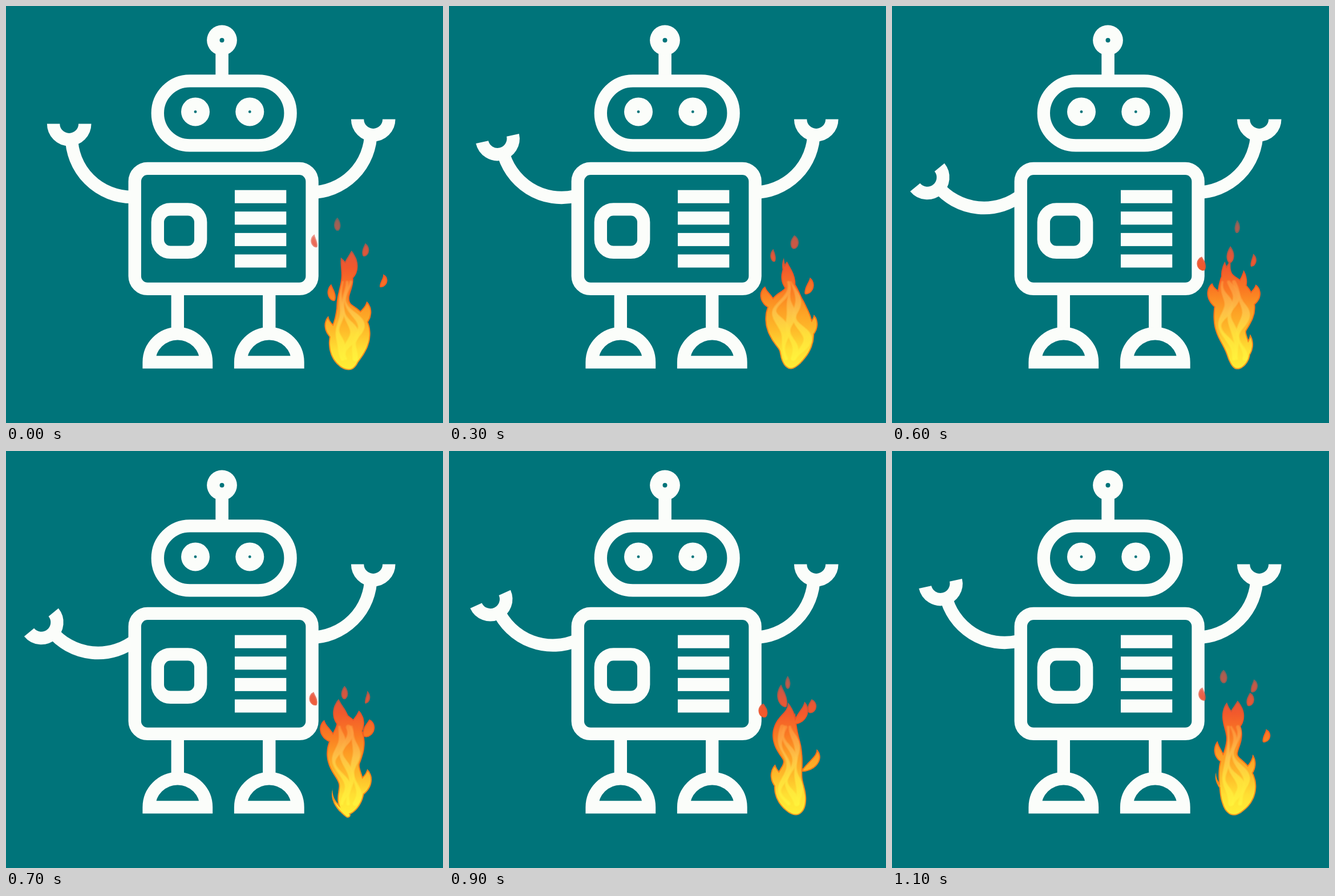
These frames come from a looping animation (766x731 px, 1200 ms). An HTML page with a canvas:

```html
<!DOCTYPE html>
<html lang="en">
<head>
<meta charset="utf-8">
<title>Waving robot</title>
<style>
html, body { margin: 0; width: 100%; height: 100%; overflow: hidden; background: #00747a; }
canvas { display: block; }
</style>
</head>
<body>
<canvas id="stage" width="766" height="731"></canvas>
<script>
const ctx = document.getElementById('stage').getContext('2d');
const TEAL = '#00747a', WHITE = '#fbfdfa', LINE = 22.4;
const LOOP = 1200, BEAT = 100, TAU = Math.PI * 2;

// Left hand: x, y and tilt in degrees, two beats per pose, down and up again
const POSES = [[110.7, 206.5, 0], [85, 232.5, -12.8], [72.5, 259.7, -24.4], [61.9, 300.4, -39.3]];

// ---- Fire: a swaying column with licks that rise, break off and fade ----
const BASE = 632, HEIGHT = 192, LIFE = 900;

// Each lick: birth in ms, start, end, size
const LICKS = [
  { born: 1100, from: [569, 580], to: [536, 425], size: 14 },
  { born: 300, from: [572, 548], to: [541, 420], size: 13 },
  { born: 700, from: [573, 610], to: [568, 425], size: 10 },
  { born: 200, from: [640, 578], to: [634, 420], size: 14 },
  { born: 500, from: [622, 612], to: [672, 455], size: 10 },
  { born: 1000, from: [632, 565], to: [633, 440], size: 10 },
  { born: 900, from: [606, 475], to: [605, 395], size: 12 },
  { born: 100, from: [592, 485], to: [594, 405], size: 10 },
  { born: 500, from: [584, 480], to: [580, 365], size: 11 },
  { born: 500, from: [614, 490], to: [634, 420], size: 11 }
];

function ramp(...stops) {
  const g = ctx.createLinearGradient(0, 360, 0, 636);
  stops.forEach(([at, color]) => g.addColorStop(at, color));
  return g;
}
const EDGE = ramp([0, 'rgba(225,90,75,.4)'], [.22, 'rgba(225,80,60,.7)'], [.4, '#ee5426'], [.7, '#f97a1a'], [1, '#f59a22']);
const FIRE = ramp([0, 'rgba(235,90,70,.2)'], [.22, 'rgba(236,85,60,.6)'], [.36, '#f2592c'], [.5, '#fa7a22'],
  [.62, '#fd9d24'], [.75, '#feb929'], [.88, '#ffdf33'], [1, '#ffee34']);
const GLOW = ramp([.36, 'rgba(255,150,60,0)'], [.5, '#fd9f40'], [.64, '#fdc44a'], [.78, '#ffe23c'], [1, '#fff93c']);

const lerp = (a, b, u) => a + (b - a) * u;
const clamp = (v, lo, hi) => Math.max(lo, Math.min(hi, v));

// Column centre and half width at height h; both waves travel upwards
const sway = (h, t) => 604 - .07 * h + 5 * Math.sin(TAU * (t / 400 - h / 90));

function girth(h, t) {
  const swell = Math.cos(TAU * (t - 300 - 7.2 * (h - 74)) / LOOP);
  return 30 * Math.sin(Math.PI * (h / HEIGHT) ** .6) * (1 + clamp(h / 200, .1, .5) * swell);
}

function columnDots(t) {
  const dots = [];
  for (let h = 6; h < HEIGHT; h += 2) dots.push([sway(h, t), BASE - h, girth(h, t)]);
  return dots;
}

function lickDots({ born, from, to, size }, t) {
  const age = ((t - born + LOOP) % LOOP) / LIFE;
  if (age > 1) return [];
  const x = lerp(from[0], to[0], age), y = lerp(from[1], to[1], age);
  const rootX = sway(clamp(BASE - y - 28, 0, HEIGHT), t);
  const bendX = x + (x - rootX) * .25;
  const broken = clamp((age - .35) * 2, 0, .55);
  const r = size * Math.min(1, age * 5) * (1 - .6 * age);
  const dots = [];
  for (let i = 0; i <= 40; i++) {
    const q = i / 40, s = lerp(broken, 1, q);
    const neck = broken ? 0 : 5 * (1 - q);
    dots.push([
      lerp(lerp(rootX, bendX, s), lerp(bendX, x, s), s),
      lerp(lerp(y + 28, y + 6, s), lerp(y + 6, y - 20, s), s),
      r * Math.sin(Math.PI * q ** .75) + neck
    ]);
  }
  return dots;
}

function fillDots(dots, inset, paint) {
  ctx.fillStyle = paint;
  ctx.beginPath();
  for (const [x, y, r] of dots) {
    if (r <= inset) continue;
    ctx.moveTo(x + r - inset, y);
    ctx.arc(x, y, r - inset, 0, TAU);
  }
  ctx.fill();
}

function drawFire(t) {
  const dots = columnDots(t).concat(...LICKS.map(l => lickDots(l, t)));
  fillDots(dots, 0, EDGE);
  fillDots(dots, 2, FIRE);

  // Bright wisps winding up through the column
  for (const lane of [-.5, 0, .5]) {
    const wisp = [];
    for (let h = 14; h < 150; h += 2) {
      const wave = Math.sin(TAU * (t / 600 - h / 75 + lane * .7));
      const w = girth(h, t);
      wisp.push([sway(h, t) + w * (lane + .2 * wave), BASE - h, w * .13 * (1 + .5 * wave)]);
    }
    ctx.globalAlpha = .5;
    fillDots(wisp, -1.5, GLOW);
    ctx.globalAlpha = .8;
    fillDots(wisp, 0, GLOW);
  }
  ctx.globalAlpha = 1;
}

// ---- Robot ----
function box(x, y, w, h, r) {
  ctx.beginPath();
  ctx.roundRect(x, y, w, h, r);
  ctx.stroke();
}

function disc(x, y, r, hole) {
  [[r, WHITE], [hole, TEAL]].forEach(([size, color]) => {
    ctx.fillStyle = color;
    ctx.beginPath();
    ctx.arc(x, y, size, 0, TAU);
    ctx.fill();
  });
}

// Cupped hand at the local origin with a quarter-circle arm towards the body
function arm([x, y, tilt], side) {
  ctx.save();
  ctx.translate(x, y);
  ctx.rotate(tilt * TAU / 360);
  ctx.scale(side, 1);
  ctx.beginPath();
  ctx.arc(0, 0, 27.6, 0, Math.PI);
  ctx.stroke();
  ctx.beginPath();
  ctx.arc(110, 22.6, 105.8, TAU / 4, TAU / 2);
  ctx.stroke();
  ctx.restore();
}

function drawRobot(pose) {
  ctx.strokeStyle = WHITE;
  ctx.lineWidth = LINE;
  arm(pose, 1);
  arm([643.7, 198.5, 0], -1);

  ctx.fillStyle = WHITE;
  ctx.fillRect(367.3, 78, 22.6, 46);
  for (const x of [300.8, 461.3]) {
    ctx.fillRect(x - LINE / 2, 500, LINE, 70);
    ctx.beginPath();
    ctx.arc(x, 624.4, 50.2, Math.PI, TAU);
    ctx.closePath();
    ctx.stroke();
  }
  for (let i = 0; i < 4; i++) ctx.fillRect(401, 322.7 + i * 37.6, 90.3, 23);

  box(265.8, 131.4, 232.8, 113, 56.4);
  box(225.7, 284.9, 310.9, 211, 22.5);
  box(265.8, 356.4, 75.4, 75.4, 22.5);
  disc(378.5, 60, 26.4, 4);
  disc(332, 185.4, 25, 2.4);
  disc(427.3, 185.4, 25, 2.4);
}

function draw(now) {
  const beat = Math.floor(now % LOOP / BEAT);
  const held = beat === 1 ? 0 : beat;
  const pose = Math.floor(Math.min(held, LOOP / BEAT + 1 - held) / 2);
  ctx.fillStyle = TEAL;
  ctx.fillRect(0, 0, 766, 731);
  drawRobot(POSES[pose]);
  drawFire(held * BEAT);
}

const start = performance.now();
function tick() {
  draw(performance.now() - start);
  requestAnimationFrame(tick);
}
tick();
</script>
</body>
</html>
```
